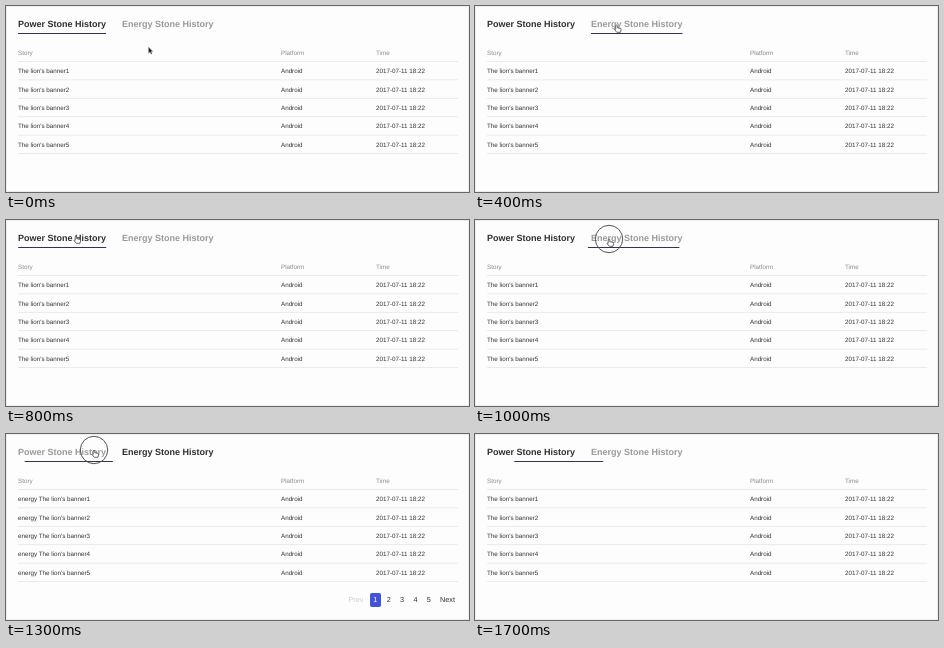
Animation of 463x186 px, one loop 1800 ms. Source, as an HTML page with a canvas:

```html
<!DOCTYPE html>
<html lang="en">
<head>
<meta charset="utf-8">
<title>Stone history tabs</title>
<style>
  html, body { margin: 0; overflow: hidden; }
  canvas { display: block; }
</style>
</head>
<body>
<canvas id="stage" width="463" height="186"></canvas>
<script>
const ctx = document.getElementById('stage').getContext('2d');
const LOOP = 1800, STEP = 100, SLIDE = 250;
const TABS = [
  { label: 'Power Stone History', x: 12, width: 88 },
  { label: 'Energy Stone History', x: 116, width: 91.5 }
];

// [start time, tab the underline slides to]
const slides = [[85, 1], [581, 0], [827, 1], [1150, 0], [1450, 1], [1610, 0]];
// [time, x, y] of the pointer tip
const pointer = [
  [0, 142.5, 41], [100, 143, 22], [300, 143, 19], [500, 140, 19], [600, 95, 17],
  [700, 70, 15], [800, 70, 16], [1000, 134, 19], [1100, 125, 19],
  [1300, 88, 16], [1400, 88, 16], [1600, 135, 19]
];
const clicks = [1000, 1300];

const arrow = new Path2D('M0 0V6.2L1.5 5L2.5 7.2L3.5 6.7L2.6 4.6H4.4Z');
const hand = new Path2D('M-.8 .7Q0 -.5 .8 .7V2.7L4 3.4Q4.7 3.6 4.6 4.5L4 7.3H.3L-2 4.6Q-2 3.6 -.8 4.3Z');

function text(str, x, y, size, color, weight = '', align = 'left') {
  ctx.font = `${weight} ${size}px "Liberation Sans", Arial, sans-serif`;
  ctx.textAlign = align;
  ctx.fillStyle = color;
  ctx.fillText(str, x, y);
}

function rect(x, y, w, h, color) {
  ctx.fillStyle = color;
  ctx.fillRect(x, y, w, h);
}

function tableRow(cells, y, color) {
  [12, 275, 370].forEach((x, i) => text(cells[i], x, y, 6.25, color));
  rect(12, y + 6.3, 440, 0.8, '#e6e6e6');
}

function pagination() {
  text('Prev', 342.5, 168.3, 7.3, '#ccc');
  ctx.fillStyle = '#4353d6';
  ctx.beginPath();
  ctx.roundRect(364, 159, 11, 14, 2);
  ctx.fill();
  for (let i = 0; i < 5; i++) {
    text(i + 1, 369.3 + i * 13.4, 168.3, 7.3, i ? '#333' : '#fff', '', 'center');
  }
  text('Next', 434, 168.3, 7.3, '#333');
}

function underline(t) {
  let pos = 0;
  for (const [start, tab] of slides) {
    if (t < start) break;
    const rest = Math.max(0, 1 - (t - start) / SLIDE) ** 3;
    pos = tab ? 1 - rest : rest;
  }
  const [a, b] = TABS;
  rect(a.x + (b.x - a.x) * pos, 27, a.width + (b.width - a.width) * pos, 1, '#30344f');
}

function drawPointer(t) {
  const next = pointer.findIndex(key => key[0] >= t);
  if (next < 0) return;
  const b = pointer[next], a = pointer[Math.max(0, next - 1)];
  const k = (t - a[0]) / (b[0] - a[0] || 1);
  const x = a[1] + (b[1] - a[1]) * k, y = a[2] + (b[2] - a[2]) * k;
  ctx.save();
  ctx.translate(x, y);
  if (clicks.includes(t)) {
    ctx.strokeStyle = '#555';
    ctx.lineWidth = 1;
    ctx.beginPath();
    ctx.arc(0, 0, 13.7, 0, Math.PI * 2);
    ctx.stroke();
  }
  const shape = t ? hand : arrow;
  ctx.fillStyle = t ? '#fff' : '#222';
  ctx.strokeStyle = t ? '#444' : '#aaa';
  ctx.lineWidth = t ? 0.8 : 0.4;
  ctx.fill(shape);
  ctx.stroke(shape);
  ctx.restore();
}

function draw(now) {
  const t = Math.floor(now % LOOP / STEP) * STEP;
  const active = (t >= 500 && t < 800) || (t >= 1100 && t < 1400) ? 1 : 0;
  rect(0, 0, 463, 186, '#fdfdfd');
  ctx.strokeStyle = '#ececec';
  ctx.lineWidth = 1;
  ctx.strokeRect(0.5, 0.5, 462, 185);
  ctx.textRendering = 'geometricPrecision';

  TABS.forEach((tab, i) => text(tab.label, tab.x, 21.3, 9, i === active ? '#2e2e2e' : '#999', 'bold'));
  underline(t);

  tableRow(['Story', 'Platform', 'Time'], 48.8, '#8a8a8a');
  for (let i = 1; i <= 5; i++) {
    const story = `${active ? 'energy ' : ''}The lion's banner${i}`;
    tableRow([story, 'Android', '2017-07-11 18:22'], 48.8 + i * 18.4, '#333');
  }
  if (active) pagination();
  drawPointer(t);
}

const begin = performance.now();
function tick() {
  draw(performance.now() - begin);
  requestAnimationFrame(tick);
}
tick();
</script>
</body>
</html>
```
